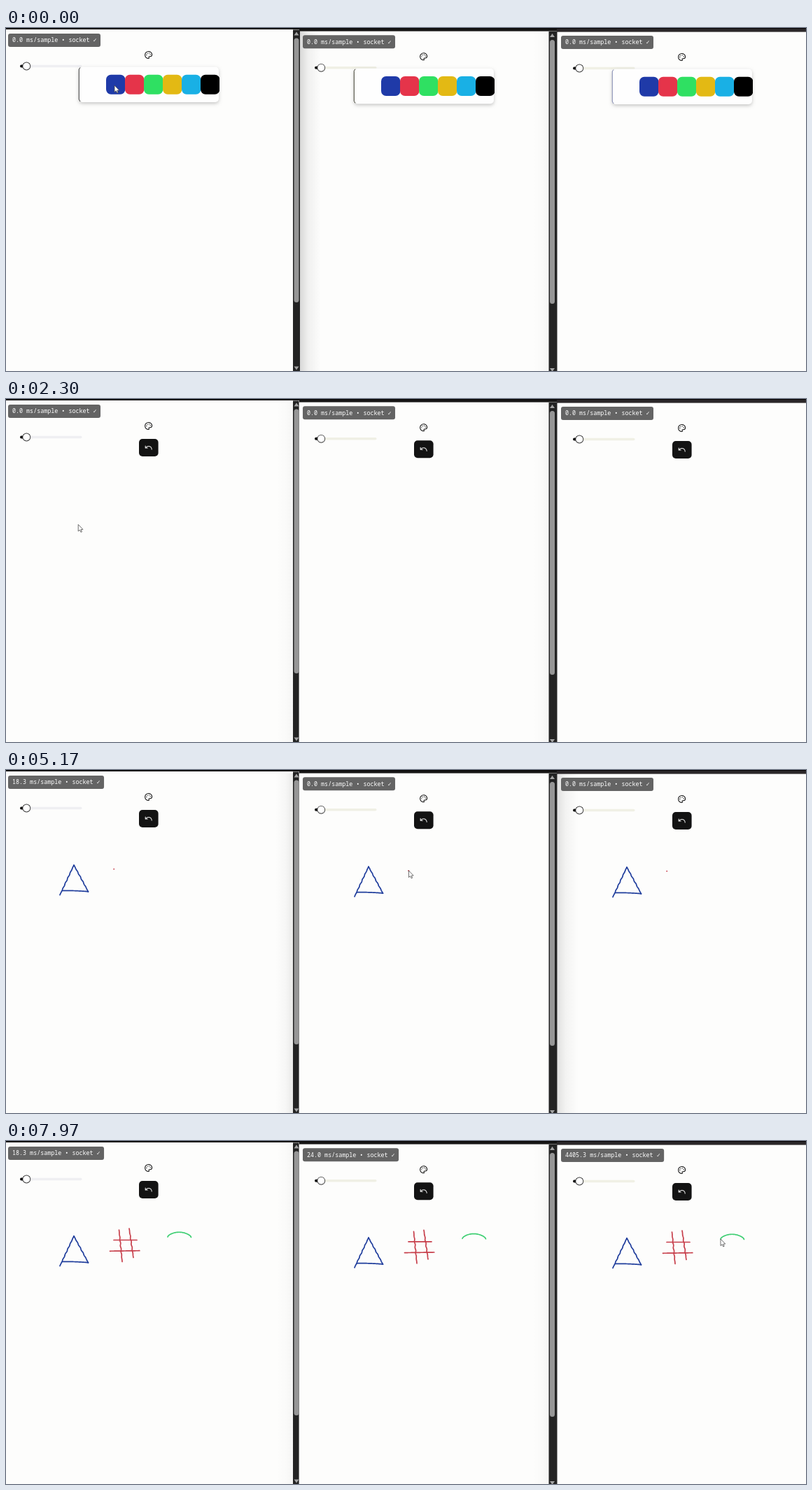
An HTML page with a canvas that plays this animation: 1143 px wide and 490 px high, repeating every 8 s.

```html
<!DOCTYPE html>
<html lang="en">
<head>
<meta charset="utf-8">
<title>Shared drawing board</title>
<style>
  html, body { margin: 0; width: 100%; height: 100%; overflow: hidden; background: #fdfdfc; }
  canvas { display: block; width: 1143px; height: 490px; }
</style>
</head>
<body>
<canvas id="stage" width="1143" height="490"></canvas>
<script>
const LOOP = 8000;
const CHAR = 5.05;
const BLUE = '#1f3d9c', RED = '#c73f4b', GREEN = '#3fcf73';
const SWATCHES = ['#1f3aa8', '#e5344a', '#2fe062', '#e3b914', '#19b0e5', '#000'];
const c = document.getElementById('stage').getContext('2d');

// dx/dy place the board, mx places the centred menu, pick is when a colour is chosen
const panels = [
  { dx: 0, dy: 0, mx: 0, pick: 50, track: '#efeff2', edge: '#3c3c3c' },
  { dx: 421, dy: 2.3, mx: 393, pick: 800, track: '#f0f0e5', edge: '#3e3e30' },
  { dx: 790, dy: 3, mx: 762, pick: 1230, track: '#f0f0e5', edge: '#8088b0' }
];

// Each stroke runs between two points; bow lifts its middle, reading is the badge value once done
const strokes = [
  { by: 0, t0: 2640, t1: 2980, color: BLUE, from: [77, 178.5], to: [97, 135.8], reading: '12.4' },
  { by: 0, t0: 3000, t1: 3450, color: BLUE, from: [97, 135.8], to: [117.5, 173.8] },
  { by: 0, t0: 3480, t1: 3950, color: BLUE, from: [117.5, 173.8], to: [80, 172.5], bow: 0.6, reading: '18.3' },
  { by: 1, t0: 5168, t1: 5400, color: RED, from: [154, 141.5], to: [187, 141.5], reading: '23.9' },
  { by: 1, t0: 5560, t1: 5860, color: RED, from: [148.5, 157.3], to: [190.8, 156.7] },
  { by: 1, t0: 6050, t1: 6330, color: RED, from: [161.5, 127], to: [166, 172.5] },
  { by: 1, t0: 6580, t1: 6920, color: RED, from: [176, 125], to: [182, 166.5], reading: '24.0' },
  { by: 2, t0: 7650, t1: 7965, color: GREEN, from: [264.5, 137.5], to: [231, 137], bow: 7, reading: '4405.3' }
];

const clamp = v => Math.max(0, Math.min(1, v));
const ease = v => v * v * v * (v * (6 * v - 15) + 10);
const mix = (a, b, k) => a + (b - a) * k;
const progress = (s, t) => clamp((t - s.t0) / (s.t1 - s.t0));

// Point of a stroke at fraction u, with a slight unsteady hand
function pointAt(s, u) {
  const [x0, y0] = s.from, [x1, y1] = s.to;
  const len = Math.hypot(x1 - x0, y1 - y0);
  const lift = (s.bow || 0) * Math.sin(Math.PI * u) ** 0.6;
  const sway = 0.45 * Math.sin(u * len * 0.75) * Math.sin(Math.PI * u);
  return [mix(x0, x1, u) + sway * (y1 - y0) / len, mix(y0, y1, u) - lift];
}

const onStage = (s, [x, y]) => [x + panels[s.by].dx, y + panels[s.by].dy];

// Pointer stops: a pause, a hover, every colour click and both ends of each stroke
const stops = [
  [250, 316, 90], [470, 316, 90], [1470, 252, 184],
  ...panels.map((p, i) => [p.pick, p.mx + 155 + 27 * i, 82 + p.dy]),
  ...strokes.flatMap(s => [[s.t0, ...onStage(s, s.from)], [s.t1, ...onStage(s, s.to)]])
].sort((a, b) => a[0] - b[0]);

function pointer(t) {
  const s = strokes.find(s => t >= s.t0 && t <= s.t1);
  if (s) return onStage(s, pointAt(s, progress(s, t)));
  const i = stops.findIndex(p => p[0] > t);
  if (i < 0) return stops[stops.length - 1].slice(1);
  const b = stops[i], a = stops[i - 1] || b;
  const k = a === b ? 0 : ease((t - a[0]) / (b[0] - a[0]));
  return [mix(a[1], b[1], k), mix(a[2], b[2], k)];
}

// The window touched last is in front
function focusAt(t) {
  const drawn = strokes.filter(s => s.t0 <= t).pop();
  if (drawn) return drawn.by;
  return Math.max(0, panels.filter(p => p.pick <= t).length - 1);
}

function readingAt(panel, t) {
  const done = strokes.filter(s => panels[s.by] === panel && s.reading && s.t1 <= t).pop();
  return done ? done.reading : '0.0';
}

function rect(x, y, w, h, color) {
  c.fillStyle = color;
  c.fillRect(x, y, w, h);
}

function round(x, y, w, h, r, color) {
  c.fillStyle = color;
  c.beginPath();
  c.roundRect(x, y, w, h, r);
  c.fill();
}

function disc(x, y, r, color) {
  c.fillStyle = color;
  c.beginPath();
  c.arc(x, y, r, 0, 7);
  c.fill();
}

function poly(pts, close) {
  c.beginPath();
  pts.forEach(([x, y]) => c.lineTo(x, y));
  if (close) c.closePath();
}

function at(x, y, draw) {
  c.save();
  c.translate(x, y);
  draw();
  c.restore();
}

// Soft shadow of a window edge at x, cast over the given reach
function shade(x, reach, alpha) {
  const g = c.createLinearGradient(x, 0, x + reach, 0);
  g.addColorStop(0, `rgba(0,0,0,${alpha})`);
  g.addColorStop(0.4, `rgba(0,0,0,${alpha * 0.35})`);
  g.addColorStop(1, 'rgba(0,0,0,0)');
  rect(Math.min(x, x + reach), 5, Math.abs(reach), 485, g);
}

function scrollbar(x, w, top, bottom) {
  rect(x, top - 12, w, 502 - top, '#232323');
  const mid = x + 5;
  round(mid - 3.5, top, 7, bottom - top, 3.5, '#969696');
  c.fillStyle = '#a4a4a4';
  for (const [y, tip] of [[top - 4, -5], [top + 469, 5]]) {
    poly([[mid - 3.5, y], [mid, y + tip], [mid + 3.5, y]], true);
    c.fill();
  }
}

function windows(focus) {
  rect(0, 0, 1143, 490, '#fdfdfc');
  if (focus === 0) shade(420, 30, 0.15);
  else shade(410, -25, focus === 1 ? 0.08 : 0.03);
  if (focus === 1) shade(788, 30, 0.11);
  else shade(775, -22, 0.03);
  rect(0, 0, 420, 2, '#0b0809');
  rect(419, 0, 369, 4.6, '#171616');
  rect(787, 0, 356, 5.6, '#2c282a');
  rect(0, 0, 1143, 1.2, '#080607');
  scrollbar(410, focus === 0 ? 10 : 8.6, 14.5, 392);
  scrollbar(775.5, 12, 17, 394);
}

function badge(value) {
  const text = value + ' ms/sample • socket ✓';
  round(3, 8, 132 + (text.length - 24) * CHAR, 19, 3, '#646464');
  c.fillStyle = '#fff';
  c.font = '500 8.4px "Noto Sans Mono", "DejaVu Sans Mono", monospace';
  c.fillText(text, 9, 20.3);
}

function slider(track) {
  round(20, 52.7, 88.5, 3.6, 1.8, track);
  round(20, 52.5, 9, 4, 2, '#111');
  disc(29.3, 54.5, 5.9, '#333');
  disc(29.3, 54.5, 5, '#fff');
}

const undoShape = new Path2D('M3 7v6h6M21 17a9 9 0 0 0-9-9 9 9 0 0 0-6 2.3L3 13');
const paletteShape = new Path2D('M12 2a10 10 0 0 0 0 20c2 0 2-2 1.2-2.8-1-1.2 0-2.8 1.2-2.8h2c3 0 5.6-2.5 5.6-5.5C22 6 17.5 2 12 2z');

// Icons live on a 24-unit grid at half size
function icon(shape, x, y, color, dots = 0) {
  at(x, y, () => {
    c.scale(0.5, 0.5);
    c.translate(-12, -12);
    c.strokeStyle = color;
    c.lineWidth = 2.1;
    c.lineCap = c.lineJoin = 'round';
    c.stroke(shape);
    for (let i = 0; i < dots; i++) {
      const a = Math.PI + 0.95 * i;
      disc(12 + 5.6 * Math.cos(a), 12 + 5.6 * Math.sin(a), 1.3, color);
    }
  });
}

function popup(edge, alpha) {
  c.save();
  c.globalAlpha = alpha;
  c.shadowColor = 'rgba(0,0,0,.22)';
  c.shadowBlur = 5;
  c.shadowOffsetY = 2;
  round(104, 55.5, 200, 50.5, 5, '#fefefe');
  c.shadowColor = 'transparent';
  c.strokeStyle = edge;
  c.lineWidth = 1;
  poly([[106, 56.5], [104.3, 59], [104.3, 102], [106, 105]]);
  c.stroke();
  c.beginPath();
  c.rect(104, 55, 201, 51);
  c.clip();
  SWATCHES.forEach((color, i) => round(143 + 27 * i, 66.7, 27.4, 28, 7, color));
  c.restore();
}

function menu(p, t) {
  const open = 1 - clamp((t - p.pick) / 100);
  icon(paletteShape, 203.6, 38.5, '#111', 4);
  if (open < 1) {
    round(190, 57, 27.6, 25, 5, '#131313');
    icon(undoShape, 203.7, 69.4, '#eee');
  }
  if (open > 0) popup(p.edge, open);
}

function drawing(t) {
  c.lineCap = c.lineJoin = 'round';
  c.lineWidth = 1.7;
  for (const s of strokes) {
    if (t < s.t0) continue;
    const end = progress(s, t), steps = 40;
    c.strokeStyle = s.color;
    poly(Array.from({ length: steps + 1 }, (_, i) => pointAt(s, end * i / steps)));
    c.stroke();
  }
}

function cursor(x, y) {
  at(x, y, () => {
    poly([[0, 0], [0, 9.6], [2.2, 7.7], [3.8, 11], [5.2, 10.3], [3.8, 7.2], [6.7, 7]], true);
    c.fillStyle = '#fff';
    c.fill();
    c.strokeStyle = '#4a4a4a';
    c.lineWidth = 0.8;
    c.lineJoin = 'miter';
    c.stroke();
  });
}

function render(t) {
  windows(focusAt(t));
  for (const p of panels) {
    at(p.dx, p.dy, () => {
      badge(readingAt(p, t));
      slider(p.track);
      drawing(t);
    });
    at(p.mx, p.dy, () => menu(p, t));
  }
  cursor(...pointer(t));
}

const start = performance.now();
function tick() {
  render((performance.now() - start) % LOOP);
  requestAnimationFrame(tick);
}
tick();
</script>
</body>
</html>
```
